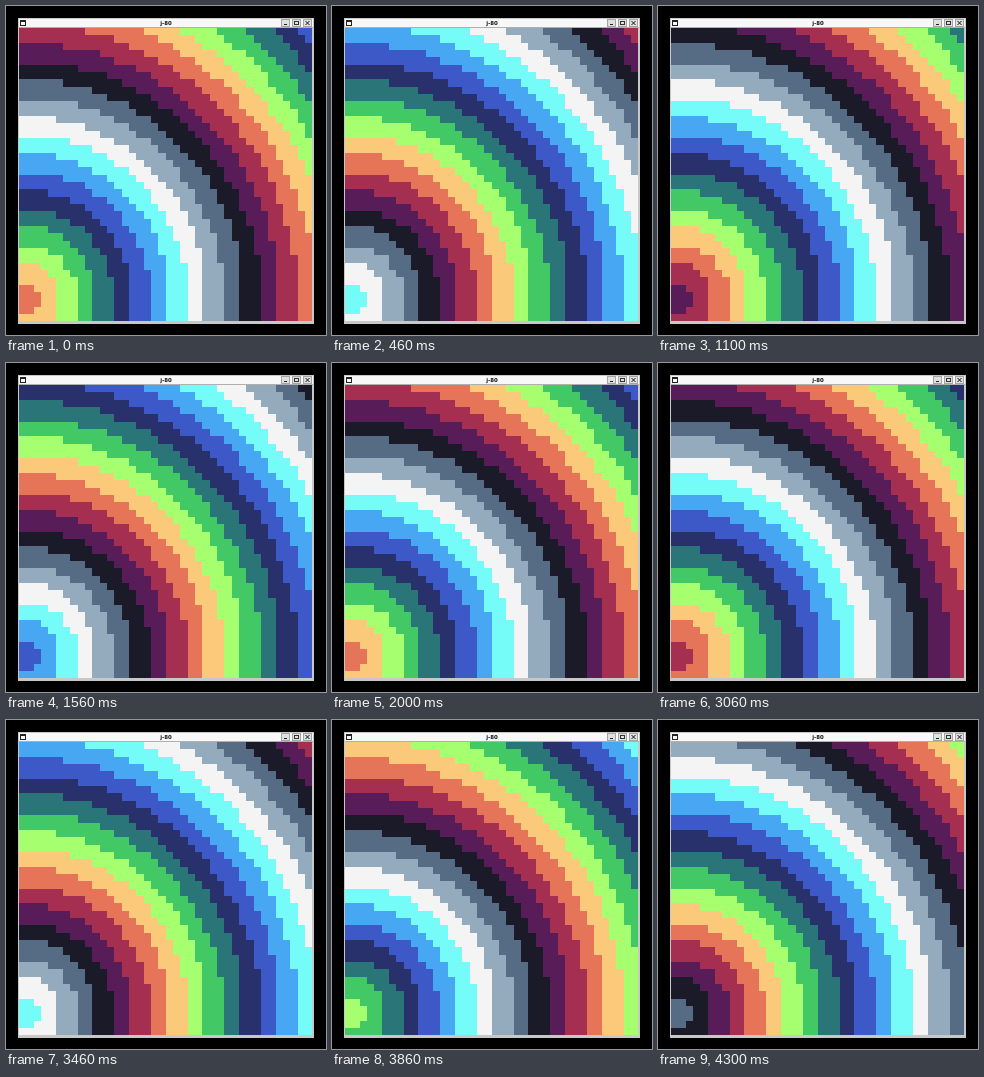
Write an HTML page with a canvas that moves like this. It is 320 px wide and 329 px high and loops after 4340 ms.

```html
<!DOCTYPE html>
<html lang="en">
<head>
<meta charset="utf-8">
<style>
html, body { margin: 0; width: 320px; height: 329px; overflow: hidden; background: #000; }
canvas { display: block; }
#title {
  position: absolute; left: 12px; top: 13px; width: 296px;
  font: bold 5.4px/8px "DejaVu Sans", sans-serif;
  text-align: center; color: #111;
}
</style>
</head>
<body>
<canvas id="stage" width="320" height="329"></canvas>
<div id="title">j-80</div>
<script>
const ctx = document.getElementById('stage').getContext('2d');
const palette = [
  '#1a1a28', '#581c58', '#a52f51', '#e57459', '#fac97a',
  '#a6ff6e', '#43c866', '#2a7577', '#29316c', '#3d59c8',
  '#48a7f2', '#76fcf8', '#f4f4f4', '#94abbe', '#566b84'
];
const LOOP = 4340, LAST = 129, CELLS = 40, CELL = 7.33, BAND = 2.5;
const LEFT = 13, TOP = 22, CENTER_ROW = 36.5;

function rect(color, x, y, w, h) {
  ctx.fillStyle = color;
  ctx.fillRect(x, y, w, h);
}

function box(color, x, y, w, h) {
  ctx.strokeStyle = color;
  ctx.lineWidth = 1;
  ctx.strokeRect(x + 0.5, y + 0.5, w - 1, h - 1);
}

function drawWindow() {
  rect('#c8c8c8', 12, 12, 296, 306);
  rect('#f8f8f8', 13, 13, 294, 8);
  rect('#b0b0b0', 13, 21, 294, 1);

  // window icon
  box('#222', 14, 14, 6, 6);
  rect('#222', 14, 14, 6, 2);

  // minimise, maximise, close
  for (const x of [275, 286, 297]) {
    rect('#e0e0e0', x, 13, 9, 8);
    box('#a4a4a4', x, 13, 9, 8);
  }
  rect('#222', 278, 18, 3, 1);
  box('#333', 288, 15, 5, 4);
  ctx.strokeStyle = '#111';
  ctx.beginPath();
  ctx.moveTo(299.5, 15);
  ctx.lineTo(303.5, 19);
  ctx.moveTo(303.5, 15);
  ctx.lineTo(299.5, 19);
  ctx.stroke();
}

const edge = i => Math.round(i * CELL);

function drawRings(shift) {
  for (let row = 0; row < CELLS; row++) {
    for (let col = 0; col < CELLS; col++) {
      const band = Math.floor(Math.hypot(col, row - CENTER_ROW) / BAND);
      const x = edge(col), y = edge(row);
      // 75 keeps the index positive
      rect(palette[(band + 3 - shift + 75) % 15],
        LEFT + x, TOP + y, edge(col + 1) - x, edge(row + 1) - y);
    }
  }
}

let start;
function tick(now) {
  start ??= now;
  const t = (now - start) % LOOP;
  const step = Math.min(LAST, Math.floor((t + 7) * 0.03));
  drawRings(Math.floor(step * 14.9 / 30 + 0.75));
  requestAnimationFrame(tick);
}

drawWindow();
drawRings(0);
requestAnimationFrame(tick);
</script>
</body>
</html>
```
